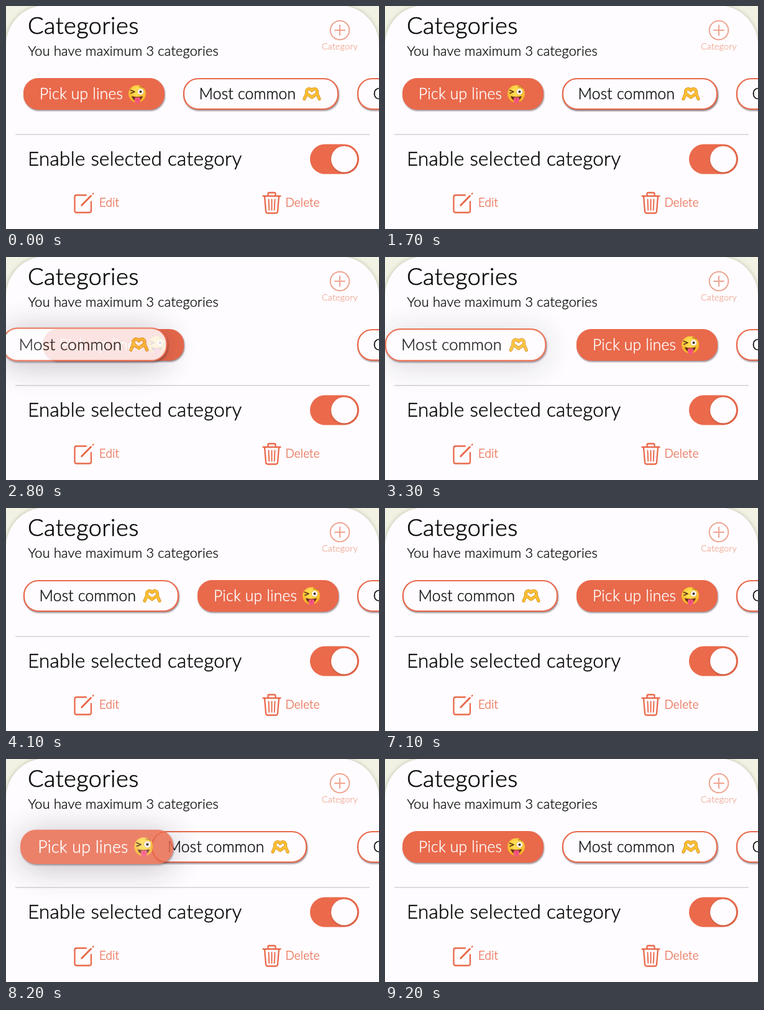
An HTML page for the animation above (9300 ms loop, 600x359 px).

```html
<!DOCTYPE html>
<html lang="en">
<head>
<meta charset="utf-8">
<title>Reordering categories</title>
<style>
  html, body { margin: 0; width: 100%; height: 100%; overflow: hidden; background: #f1f2e3; }
  svg { display: block; width: 100vw; height: 100vh; }
  text { font: 300 24.6px Lato, "Open Sans", sans-serif; letter-spacing: .01em; fill: #0c0c0c; stroke: #0c0c0c; stroke-width: .018em; }
  .accent { fill: #e9694b; stroke: #e9694b; }
  .pale { fill: #f0a995; stroke: #f0a995; }
  .light { fill: #fff; stroke: #fff; }
  .icon { fill: none; stroke: #e9694b; stroke-width: 2.3; stroke-linecap: round; stroke-linejoin: round; }
  .chip { fill: #fefcff; stroke: #e9694b; stroke-width: 2.2; }
  .rest { filter: drop-shadow(1.5px 2px 1px rgba(60, 40, 50, .5)); }
</style>
</head>
<body>
<svg viewBox="0 0 600 359" preserveAspectRatio="none">
  <defs>
    <radialGradient id="skin" cx=".5" cy=".35" r=".65">
      <stop offset=".3" stop-color="#ffdc4e"/><stop offset="1" stop-color="#f5a623"/>
    </radialGradient>
    <g id="wink">
      <circle r="14" fill="url(#skin)"/>
      <path d="M-10.5 -6L-4 -3.5L-10 -1" fill="none" stroke="#5b3514" stroke-width="1.8" stroke-linecap="round" stroke-linejoin="round"/>
      <path d="M3 -11Q7 -13 10 -9" fill="none" stroke="#a8641a" stroke-width="1.2"/>
      <circle cx="5.5" cy="-3.5" r="5" fill="#fff" stroke="#d99a35" stroke-width=".6"/>
      <circle cx="5.5" cy="-3.5" r="2.1" fill="#4a2d18"/>
      <path d="M-9 3.5Q0 6 9 3.5Q7 11 0 11Q-7 11 -9 3.5Z" fill="#683018"/>
      <path d="M-4 6Q0 4.5 5 6V11A4.5 4 0 0 1 -4 11Z" fill="#f4567e"/>
      <path d="M.5 6V11" stroke="#cf365f" stroke-width=".8"/>
    </g>
    <path id="hands" d="M-12 8L-8.5 0M12 8L8.5 0M0 5.5L-7.5 0C-11.5 -6 -4 -11.5 0 -5.5C4 -11.5 11.5 -6 7.5 0Z"
      fill="none" stroke-linejoin="round" stroke-linecap="round"/>
    <g id="pick">
      <rect class="accent" x="-113" y="-25" width="226" height="50" rx="23"/>
      <text class="light" x="-87.5" y="8.5">Pick up lines</text>
      <use href="#wink" x="69.5"/>
    </g>
    <g id="most">
      <rect class="chip" x="-124" y="-24.5" width="248" height="49" rx="23"/>
      <text x="-99.5" y="8.5">Most common</text>
      <use href="#hands" x="82" stroke="#d0820f" stroke-width="5"/>
      <use href="#hands" x="82" stroke="#fcc133" stroke-width="3.6"/>
    </g>
  </defs>

  <rect width="600" height="359" fill="#f1f2e3"/>
  <rect y="-1" width="600" height="480" rx="64" fill="#fefcff" style="filter:drop-shadow(0 0 3px rgba(90,90,60,.35))"/>

  <text x="35" y="45" style="font-size:38px">Categories</text>
  <text x="35.5" y="79.5" style="font-size:21.7px">You have maximum 3 categories</text>
  <g fill="none" stroke="#efa592" stroke-width="2" stroke-linecap="round">
    <circle cx="537" cy="39" r="15.3"/><path d="M529 39h16M537 31v16"/>
  </g>
  <text class="pale" x="508" y="70" style="font-size:14.4px">Category</text>

  <path d="M15 206.7H585" stroke="#d3d2d6" stroke-width="1.6"/>
  <text x="35" y="257" style="font-size:31.4px">Enable selected category</text>
  <rect x="489" y="222.5" width="79" height="48" rx="24" fill="#eb6a4c"/>
  <circle cx="544" cy="246.5" r="21" fill="#fefcff" style="filter:drop-shadow(0 1px 1.5px rgba(80,20,0,.3))"/>

  <g class="icon">
    <path d="M129 304.5H113.5Q110.500 304.500 110.500 307.500V329.500Q110.500 332.500 113.500 332.500H134Q137 332.500 137 329.500V315"/>
    <path d="M121.800 320.800L136.500 305.800" stroke-width="3"/>
    <path d="M139.800 302.500L140.500 301.800"/>
    <path d="M413.500 306H441.500M421.500 305.500V302.500Q421.500 300.500 423.500 300.500H431.500Q433.500 300.500 433.500 302.500V305.500"/>
    <path d="M416 306.500L418 330.500Q418.200 333.500 421 333.500H434Q436.800 333.500 437 330.500L439 306.500"/>
    <path d="M422.500 311.500L423.300 328.500M427.500 311.500V328.500M432.500 311.500L431.700 328.500" stroke-width="1.9"/>
  </g>
  <text class="accent" x="150" y="322.5" style="font-size:18.8px">Edit</text>
  <text class="accent" x="449.5" y="322.5" style="font-size:18.8px">Delete</text>

  <g class="rest">
    <rect class="chip" x="566" y="117" width="200" height="49" rx="23"/>
    <text x="590.5" y="150">C</text>
  </g>
  <use id="ghost" class="rest"/>
  <use id="other" class="rest"/>
  <use id="held"/>
</svg>
<script>
const LOOP = 9300, STEP = 100, ROW_Y = 141.5;
const [ghost, other, held] = ["ghost", "other", "held"].map(id => document.getElementById(id));

// Chip centres in each order of the row.
const PICK_FIRST = { "#pick": 141.5, "#most": 410 };
const MOST_FIRST = { "#most": 153, "#pick": 421.5 };

// "aim" is where the finger carries the chip before it drops into its slot.
const moves = [
  { held: "#most", other: "#pick", before: PICK_FIRST, after: MOST_FIRST,
    aim: 117, grow: .066, liftAt: 1700, dragAt: 2095, swapAt: 2700, dropAt: 3100 },
  { held: "#pick", other: "#most", before: MOST_FIRST, after: PICK_FIRST,
    aim: 144, grow: .084, liftAt: 7300, dragAt: 7450, swapAt: 7857, dropAt: 8300 }
];

const mix = (a, b, p) => a + (b - a) * p;

function ease(time, start, duration) {
  const p = Math.min(1, Math.max(0, (time - start) / duration));
  return p * p * (3 - 2 * p);
}

function place(el, href, x, y, scale = 1) {
  el.setAttribute("href", href);
  el.setAttribute("transform", `translate(${x} ${y}) scale(${scale})`);
}

function draw(now) {
  const t = Math.floor(now % LOOP / STEP) * STEP;
  const m = moves[t < 5600 ? 0 : 1];
  const lift = ease(t, m.liftAt, 300) - ease(t, m.dropAt, 450);
  const drag = ease(t, m.dragAt, 790);
  const carried = mix(m.before[m.held], m.aim, drag);
  const x = mix(carried, m.after[m.held], ease(t, m.dropAt, 500));
  const y = ROW_Y - 7 * Math.sin(Math.PI * drag);

  place(ghost, m.held, m.before[m.held], ROW_Y);
  ghost.style.opacity = t >= m.liftAt && t < m.swapAt ? .45 : 0;
  place(other, m.other, mix(m.before[m.other], m.after[m.other], ease(t, m.swapAt, 480)), ROW_Y);
  place(held, m.held, x, y, 1 + m.grow * lift);
  held.style.opacity = 1 - .17 * lift;
  held.style.filter = "drop-shadow(1.5px 2px 1px rgba(60,40,50,.5))" +
    (lift ? ` drop-shadow(0 5px 24px rgba(30,20,30,${.32 * lift}))` : "");
  requestAnimationFrame(() => draw(performance.now()));
}
draw(0);
</script>
</body>
</html>
```
